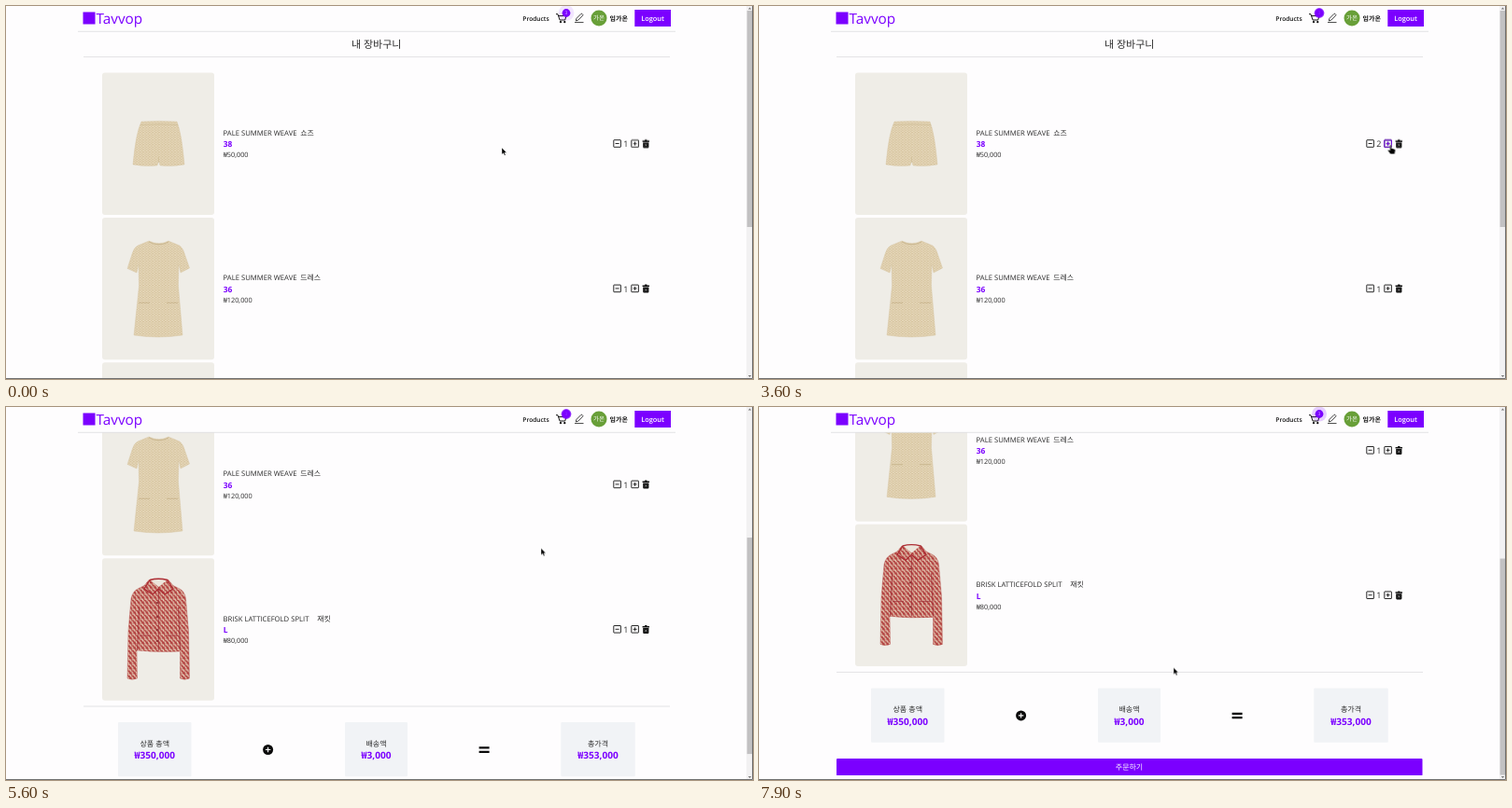
Animation of 800 by 400 pixels, one loop 8 s. Source, as an HTML page:

```html
<!DOCTYPE html>
<html lang="ko">
<head>
<meta charset="utf-8">
<title>장바구니</title>
<style>
html, body { margin: 0; width: 100%; height: 100%; overflow: hidden; background: #fefdfe; }
svg { display: block; width: 800px; height: 400px; }
text { font: 400 7.7px "Open Sans", "Noto Sans CJK KR", "Noto Sans CJK", sans-serif; fill: #2a2a2a; text-rendering: geometricPrecision; white-space: pre; }
.bold { font-weight: 700; }
.semi { font-weight: 600; fill: #111; }
.mid { text-anchor: middle; }
.brand { fill: #7b00ff; }
.white { fill: #fff; }
.icon { fill: none; stroke: #111; }
.rule { stroke: #e0dfe2; stroke-width: .9; }
</style>
</head>
<body>
<svg viewBox="0 0 800 400">
  <defs>
    <pattern id="tweed" width="3.4" height="2.6" patternUnits="userSpaceOnUse">
      <path fill="#dfceab" d="M0 0h4v3H0z"/>
      <path stroke="#cdb991" stroke-width=".7" d="M0 .6h1.9M2.3 1.9h1.1"/>
      <path stroke="#efe6d2" stroke-width=".7" d="M2 .6h1.2M.3 1.9h1.5"/>
    </pattern>
    <pattern id="weave" width="4.4" height="5.4" patternUnits="userSpaceOnUse">
      <path fill="#b24140" d="M0 0h5v6H0z"/>
      <path stroke="#e9d5bd" stroke-width="1.3" fill="none" d="M.4 .4l1.6 2.7M2.6 3.1l1.5 2.1M3.4 .2l.7 1.4"/>
    </pattern>
    <g id="minus" class="icon" stroke-width=".9"><rect x="650.8" y="-4" width="7.6" height="7.6" rx=".4"/><path d="M652.6 -.2h4"/></g>
    <g id="plus" fill="none" stroke-width=".9"><rect x="669.8" y="-4" width="7.6" height="7.6" rx=".4"/><path d="M671.6 -.2h4M673.6 -2.2v4"/></g>
    <g id="trash">
      <path fill="#111" d="M681.6 -3.6h2.2l.6-.9h1.8l.6.9h2.2v1.5h-7.4zM682.2 -1.6h6.2v5q0 1.1-1.1 1.1h-4q-1.1 0-1.1-1.1z"/>
      <path stroke="#fff" stroke-width=".4" d="M684.2 .2l2.2 2.4M686.4 .2l-2.2 2.4"/>
    </g>
  </defs>
  <rect width="800" height="400" fill="#fefdfe"/>

  <g id="page">
    <text class="mid" x="396.7" y="45" style="font-size:11px">내 장바구니</text>
    <path class="rule" d="M83 54.6H711M83 541H711"/>
    <g id="items"></g>

    <g id="shorts">
      <path fill="url(#tweed)" stroke="#d3c3a0" stroke-width=".4" d="M145 124Q164 122.8 183 124Q188 136 191 170Q178 172.500 165 171L163.500 166L162 171Q149 172.500 136 170Q139 136 145 124Z"/>
      <path fill="none" stroke="#c9b68f" stroke-width=".5" d="M144 127.500Q164 126.300 184 127.500M163.500 162V168"/>
    </g>
    <g id="dress">
      <path fill="url(#tweed)" stroke="#d3c3a0" stroke-width=".4" d="M153 252Q164 257 174 252L186 257Q190 260 192 268L196.500 281L187 286L185 277L184.500 300L189 353Q163 357 137 353L142.500 300L142 277L140 286L130 281.500L135 266Q137 259 141 257Z"/>
      <path fill="none" stroke="#c2ae85" stroke-width=".7" d="M153 253Q164 258.500 174 253M142 318.300H154M172 318.300H184"/>
    </g>
    <g id="jacket" transform="translate(0 220)">
      <path fill="url(#weave)" stroke="#b65450" stroke-width=".4" d="M153 185.500Q163 188 174 185.500L179 191.500L185 194.500Q191 197 192.500 205L195.500 240L196.500 291Q191 293.500 186.500 291L186.500 262Q163 263.500 140 261L140.500 291Q135 293.500 130 291L131 240L134 205Q136 197 142 194.500L148 191.500Z"/>
      <path fill="#ece6dc" d="M155 186Q163.500 183.500 172 186L163.500 193Z"/>
      <path fill="none" stroke="#ad2c33" stroke-width="1.300" d="M154 185.500L148 195L157 201L163.300 195L170 201L179 195L173 185.500Q163 183 154 185.500"/>
      <path fill="none" stroke="#a3343a" stroke-width=".8" d="M163.300 196V261M143 245H155M171 245H184M142.500 215L140.500 261M184.500 215L186.500 261"/>
      <path stroke="#7e2026" stroke-width="1.800" stroke-linecap="round" d="M162 210h0M162 225h0M162 239h0M162 251h0"/>
    </g>

    <g id="totals"></g>
    <circle cx="280.600" cy="587.500" r="5.500" fill="#0a0a0a"/>
    <path stroke="#fff" stroke-width="1.100" d="M277.900 587.500h5.400M280.600 584.800v5.400"/>
    <path stroke="#0a0a0a" stroke-width="2.200" d="M506.600 585.400h11M506.600 589.800h11"/>
    <rect class="brand" x="83" y="633.600" width="627.500" height="18.400" rx="1"/>
    <text class="mid white" x="396.500" y="645.500" style="font-size:8px">주문하기</text>
  </g>

  <g id="header">
    <rect width="793" height="27" fill="#fefdfe"/>
    <path class="rule" d="M77 27.300H717"/>
    <rect class="brand" x="82.500" y="6.500" width="13" height="13"/>
    <text class="brand" x="96.500" y="19" style="font-size:15.300px">Tavvop</text>
    <text class="semi" x="553.300" y="16" style="font-size:6.670px">Products</text>
    <path class="icon" d="M589 8.700h1.900l2.200 6.300h5.600l1.300-4.400h-8"/>
    <circle cx="594" cy="17.200" r="1.100"/><circle cx="598.300" cy="17.200" r="1.100"/>
    <circle class="brand" cx="600" cy="7.500" r="4.400"/>
    <text class="mid" x="600" y="9.400" style="font-size:5px;fill:#e4ccff">3</text>
    <circle id="ping" class="brand" cx="600" cy="7.500" r="4.400"/>
    <path class="icon" stroke-width=".8" d="M609 17.600h9.500M610.300 15.900l.6-2.500 5-5q.5-.4 1 0l.8.8q.4.500 0 1l-5 5z"/>
    <circle cx="635" cy="12.900" r="8.500" fill="#689f38"/>
    <text class="mid white" x="635" y="15.200" style="font-size:6.500px">가온</text>
    <text class="semi" x="646.500" y="15.700" style="font-size:7px">임가온</text>
    <rect class="brand" x="673.300" y="4" width="38.700" height="18"/>
    <text class="semi mid" x="692.500" y="16" style="font-size:7.400px;fill:#fff">Logout</text>
  </g>

  <rect x="793" width="7" height="400" fill="#f2f1f2"/>
  <rect id="thumb" x="793.600" y="5" width="5.400" height="232" fill="#c2c1c2"/>
  <path fill="#777" d="M794.800 3.600l1.700-2 1.700 2zM794.800 396l1.700 2 1.700-2z"/>
  <path fill="none" stroke="#707070" d="M0 399.500H799.500V0"/>

  <g id="cursor" stroke="#fff" stroke-width=".4" fill="#000">
    <path id="arrow" d="M0 0V7.200L1.700 5.700L2.900 8.300L4.100 7.800L2.900 5.200H5.200Z"/>
    <path id="hand" d="M-.8 .3Q0 -.6 .8 .3V3.600L4.100 4.500Q5.200 5 5 6.200L4.200 9.800H-.3L-3 6Q-2.800 4.800 -1.800 5.300L-.8 6Z"/>
  </g>
</svg>
<script>
const LOOP = 8000;
const $ = id => document.getElementById(id);

// name, kind, x of kind, size, price
const items = [
  ['PALE SUMMER WEAVE', '쇼즈', 315.3, '38', '₩50,000'],
  ['PALE SUMMER WEAVE', '드레스', 315.3, '36', '₩120,000'],
  ['BRISK LATTICEFOLD SPLIT', '재킷', 333.2, 'L', '₩80,000'],
];
// label, sum, x, width
const totals = [
  ['상품 총액', '₩350,000', 120, 78.5],
  ['배송액', '₩3,000', 363, 67],
  ['총가격', '₩353,000', 594.3, 79.5],
];

const quantity = (n, id = '') =>
  `<text ${id && `id="${id}"`} class="mid" x="663.8" y="3.4" style="font-size:9px">${n}</text>`;

$('items').innerHTML = items.map(([name, kind, kindX, size, price], i) => `
  <g transform="translate(0 ${147.7 + i * 155.4})">
    <rect x="103" y="-76.2" width="120" height="152.4" rx="3" fill="#efede7"/>
    <text x="232.6" y="-8.8">${name}<tspan x="${kindX}" style="font-size:7.9px">${kind}</tspan></text>
    <text class="bold brand" x="232.8" y="3.7" style="font-size:8.4px">${size}</text>
    <text x="232.8" y="14.8" style="font-size:7.3px">${price}</text>
    <use href="#minus"/>
    ${i ? quantity(1) : [1, 2, 3].map(n => quantity(n, 'qty' + n)).join('')}
    <use href="#plus" stroke="#111"/>
    ${i ? '' : '<use id="hover" href="#plus" stroke="#7b00ff"/>'}
    <use href="#trash"/>
  </g>`).join('');

$('totals').innerHTML = totals.map(([label, sum, x, w]) => `
  <rect x="${x}" y="558" width="${w}" height="58.3" rx="1" fill="#f1f3f6"/>
  <text class="mid" x="${x + w / 2}" y="583.5" style="font-size:8px">${label}</text>
  <text class="mid bold brand" x="${x + w / 2}" y="597.4" style="font-size:10.1px">${sum}</text>`).join('');

// Holds each value of [ms, value] until the next one.
function play(el, steps, toStyle) {
  const frames = steps.map(([ms, v]) => ({ offset: ms / LOOP, easing: 'step-end', ...toStyle(v) }));
  frames.push({ ...frames.at(-1), offset: 1 });
  el.animate(frames, { duration: LOOP, iterations: Infinity });
}
const opacity = v => ({ opacity: v });
const moveTo = ([x, y]) => ({ transform: `translate(${x}px, ${y}px)` });

// Fills the gaps between [ms, x, y] points with 100 ms steps.
function path(points) {
  return points.flatMap(([ms, x, y], i) => {
    const [end, x2, y2] = points[i + 1] || [ms + 100, x, y];
    const count = Math.round((end - ms) / 100);
    return Array.from({ length: count }, (_, k) =>
      [ms + k * 100, [x + (x2 - x) * k / count, y + (y2 - y) * k / count]]);
  });
}

const scroll = [[0, 0], [5400, 45], [5500, 150], [5600, 220], [5700, 248], [5800, 257.5], [7600, 256.6]];
play($('page'), scroll, y => moveTo([0, -y]));
play($('thumb'), scroll, y => moveTo([0, y * .614]));

play($('cursor'), path([
  [0, 531, 152], [500, 531, 152], [1000, 612, 151], [1400, 664, 152], [1700, 676.5, 149],
  [5100, 676.5, 149], [5300, 661, 155], [5400, 640, 155], [5600, 573, 151.5], [5700, 535, 174],
  [6000, 341, 288], [6300, 334, 298], [6500, 334, 298], [7300, 436, 282], [7500, 436, 282], [7900, 444, 279.5],
]), moveTo);

play($('hand'), [[0, 0], [1600, 1], [5200, 0]], opacity);
play($('arrow'), [[0, 1], [1600, 0], [5200, 1]], opacity);
play($('hover'), [[0, 0], [1600, 1], [5400, 0]], opacity);
play($('qty1'), [[0, 1], [2900, 0]], opacity);
play($('qty2'), [[0, 0], [2900, 1], [3900, 0]], opacity);
play($('qty3'), [[0, 0], [3900, 1]], opacity);

$('ping').animate([
  { r: '4.4px', opacity: 1, easing: 'cubic-bezier(0, 0, .2, 1)' },
  { r: '8.8px', opacity: 0, offset: .75 },
  { r: '8.8px', opacity: 0 },
], { duration: 1000, delay: -450, iterations: Infinity });
</script>
</body>
</html>
```
